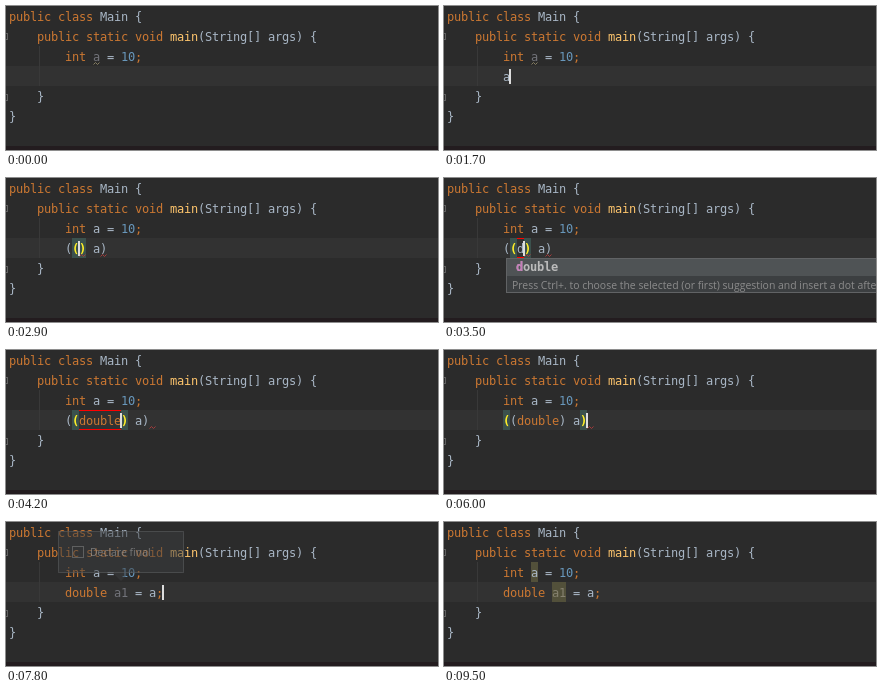
An HTML page with a canvas that plays this animation: 432x144 px, repeating every 9800 ms.

```html
<!DOCTYPE html>
<html lang="en">
<head>
<meta charset="utf-8">
<title>Postfix completion</title>
<style>
html, body { margin: 0; width: 432px; height: 144px; overflow: hidden; background: #2b2b2b; }
canvas { display: block; width: 432px; height: 144px; }
</style>
</head>
<body>
<canvas id="stage" width="432" height="144"></canvas>
<script>
const ctx = document.getElementById('stage').getContext('2d');
const LOOP = 9800, CELL = 7, ROW = 20, LEFT = 3;
const MONO = '"DejaVu Sans Mono", monospace';
const UI = '10.45px "Open Sans", "Noto Sans CJK SC", "Noto Sans CJK", sans-serif';
const C = {
  bg: '#2b2b2b', row: '#323232', text: '#a9b7c6', key: '#cc7832', fn: '#ffc66d',
  num: '#6897bb', dim: '#72737a', brace: '#ffef28', braceBg: '#3b514d',
  warn: '#52503a', error: '#a33b3b', list: '#46484a', picked: '#4f5355',
  hint: '#3c3f41', edge: '#616365', grey: '#8c8c8c', label: '#bbbbbb'
};
const colX = col => LEFT + col * CELL;

function box(color, x, y, w, h) {
  ctx.fillStyle = color;
  ctx.fillRect(x, y, w, h);
}

function outline(color, x, y, w, h) {
  ctx.strokeStyle = color;
  ctx.lineWidth = 1;
  ctx.strokeRect(x + 0.5, y + 0.5, w - 1, h - 1);
}

// Fixed-pitch text on the editor's cell grid
function mono(text, x, y, color, bold) {
  ctx.font = (bold ? 'bold ' : '') + '12px ' + MONO;
  ctx.fillStyle = color;
  [...text].forEach((ch, i) => ctx.fillText(ch, x + i * CELL, y));
}

function ui(text, x, y, color) {
  ctx.font = UI;
  ctx.fillStyle = color;
  ctx.fillText(text, x, y);
}

function code(row, col, ...parts) {
  for (const [text, color = C.text] of parts) {
    mono(text, colX(col), row * ROW + 15, color);
    col += text.length;
  }
}

function wave(col, row, color) {
  const x = colX(col), y = row * ROW + 18.5;
  ctx.strokeStyle = color;
  ctx.lineWidth = 1;
  ctx.beginPath();
  for (let i = 0; i <= 6; i += 2) ctx.lineTo(x + i + 0.5, y - (i % 4 ? 2 : 0));
  ctx.stroke();
}

function caret(col) { box('#dddddd', colX(col) - 1, 63, 2, 15); }

function brace(ch, col) {
  box(C.braceBg, colX(col), 60, CELL, ROW);
  mono(ch, colX(col), 75, C.brace, true);
}

function fieldBox(col, length) {
  outline('#ff0000', colX(col) - 1, 60, length * CELL + 2, ROW);
}

function popup(x, w, rows, hint, picked = true) {
  const h = rows.length * 18 + (hint ? 17 : 1);
  box(C.list, x, 80, w, h);
  if (picked) box(C.picked, x, 80, w, 18);
  rows.forEach(([name, tail], i) => {
    const y = 93 + i * 18;
    mono(name, x + 10, y, C.label);
    if (tail) mono(tail[1], tail[0], y, C.grey);
  });
  if (hint) {
    const y = 80 + rows.length * 18;
    box(C.hint, x, y, w, 17);
    ui(hint, x + 6, y + 12.5, C.grey);
  }
  outline(C.edge, x, 80, w, h);
}

function base(t) {
  box(C.bg, 0, 0, 432, 144);
  box(C.row, 0, 60, 432, ROW);
  box('#231c1f', 0, 140, 432, 4);
  box('#393939', 33, 40, 1, 40);
  for (const y of [27, 88]) {
    box('#606060', 0, y, 2, 1);
    box('#606060', 1, y, 1, 7);
    box('#606060', 0, y + 6, 2, 1);
  }
  code(0, 0, ['public class ', C.key], ['Main {']);
  code(1, 4, ['public static void ', C.key], ['main', C.fn], ['(String[] args) {']);
  if (t >= 8000) box(C.warn, colX(12), 40, CELL, ROW);
  const unused = t < 2900;
  code(2, 8, ['int ', C.key], ['a', unused ? C.dim : C.text], [' = '], ['10', C.num], [';', C.key]);
  if (unused) wave(12, 2, '#857d60');
  code(4, 4, ['}']);
  code(5, 0, ['}']);
}

function typing(t) {
  const text = t < 1700 ? '' : t < 1800 ? 'a' : t < 2300 ? 'a.' : 'a.c';
  code(3, 8, [text]);
  if (t >= 1700 || (t >= 600 && t < 1500)) caret(8 + text.length);
  if (t < 1900) return;
  const cast = ['cast', [361, '((SomeType) expr)']];
  const castvar = ['castvar', [368, 'T name = (T) expr']];
  if (t < 2300) {
    popup(55, 400, [['arg', [340, 'functionCall(expr)']], cast, castvar, ['format', [340, 'String.format(expr)']]]);
    return;
  }
  popup(55, 400, [cast, castvar],
    'Ctrl+向下箭头 and Ctrl+向上箭头 will move caret down and up in the editor');
  ui('>>', 426, 128.5, '#589df6');
  box('#589df6', 426, 130, 6, 1);
}

function casting(t) {
  const type = t < 3500 ? '' : t < 3600 ? 'd' : t < 3700 ? 'do' : t < 4000 ? 'dou' : 'double';
  const close = 10 + type.length;
  const open = t < 6000;
  code(3, 8, ['(('], [type, type === 'double' ? C.key : C.text], [') a)']);
  if (open) {
    fieldBox(10, type.length);
    brace('(', 9);
    brace(')', close);
    if (t >= 2900 && t < 4200) {
      wave(close, 3, C.error);
      wave(close + 3, 3, C.error);
    }
  } else {
    brace('(', 8);
    brace(')', 19);
  }
  if (t >= 4200) wave(20, 3, C.error);
  if (!open) caret(20);
  else if (t < 5100 || t >= 5600) caret(close);
  if (t >= 3500 && t < 4000) {
    popup(62, 400, [['']], 'Press Ctrl+. to choose the selected (or first) suggestion and insert a dot afterwards');
    mono('double', 72, 93, C.label, true);
    mono(type, 72, 93, '#c77dbb', true);
  }
  if (t >= 6500) actions();
}

function actions() {
  ctx.fillStyle = '#d9a343';
  ctx.beginPath();
  ctx.arc(18, 68, 5, 0, Math.PI * 2);
  ctx.fill();
  box('#9a9a9a', 16, 74, 4, 3);
  box(C.hint, 142, 80, 248, 43);
  box('#4b6eaf', 143, 81, 246, 21);
  ['Introduce local variable', 'Adjust code style settings'].forEach((label, i) => {
    ui(label, 168, 95 + i * 21, C.label);
    ui('▸', 376, 95 + i * 21, C.label);
  });
  outline(C.edge, 142, 80, 248, 43);
}

function balloon(alpha) {
  if (alpha <= 0) return;
  ctx.save();
  ctx.globalAlpha = alpha;
  ctx.beginPath();
  ctx.roundRect(52, 9, 126, 42, 4);
  ctx.moveTo(107, 51);
  ctx.lineTo(115, 59);
  ctx.lineTo(123, 51);
  ctx.fillStyle = C.hint;
  ctx.fill();
  outline(C.edge, 52, 9, 126, 42);
  outline(C.grey, 66, 24, 12, 12);
  ui('Declare final', 84, 34, C.label);
  ctx.restore();
}

function naming(t) {
  const editing = t < 7700, done = t >= 8000;
  if (editing) box('#214283', colX(15), 61, 14, 18);
  if (done) box(C.warn, colX(15), 60, 14, ROW);
  code(3, 8, ['double ', C.key], ['a1', editing ? C.text : done ? '#85816f' : C.dim], [' = a'], [';', C.key]);
  if (editing) {
    wave(22, 3, C.error);
    fieldBox(15, 2);
    caret(17);
    popup(97, 169, [['a1'], ['v']], 'Press Shift+Tab to change type', false);
  } else if (t < 8600 || (t >= 9100 && t < 9500)) {
    caret(22);
  }
  const step = Math.floor(t / 100);
  balloon(editing ? Math.min(1, (step - 72) / 2) : Math.max(0, (80 - step) / 4));
}

function draw(t) {
  base(t);
  if (t < 2600) typing(t);
  else if (t < 7200) casting(t);
  else naming(t);
}

const start = performance.now();
function tick(now) {
  draw(Math.max(0, now - start) % LOOP);
  requestAnimationFrame(tick);
}
draw(0);
requestAnimationFrame(tick);
</script>
</body>
</html>
```
